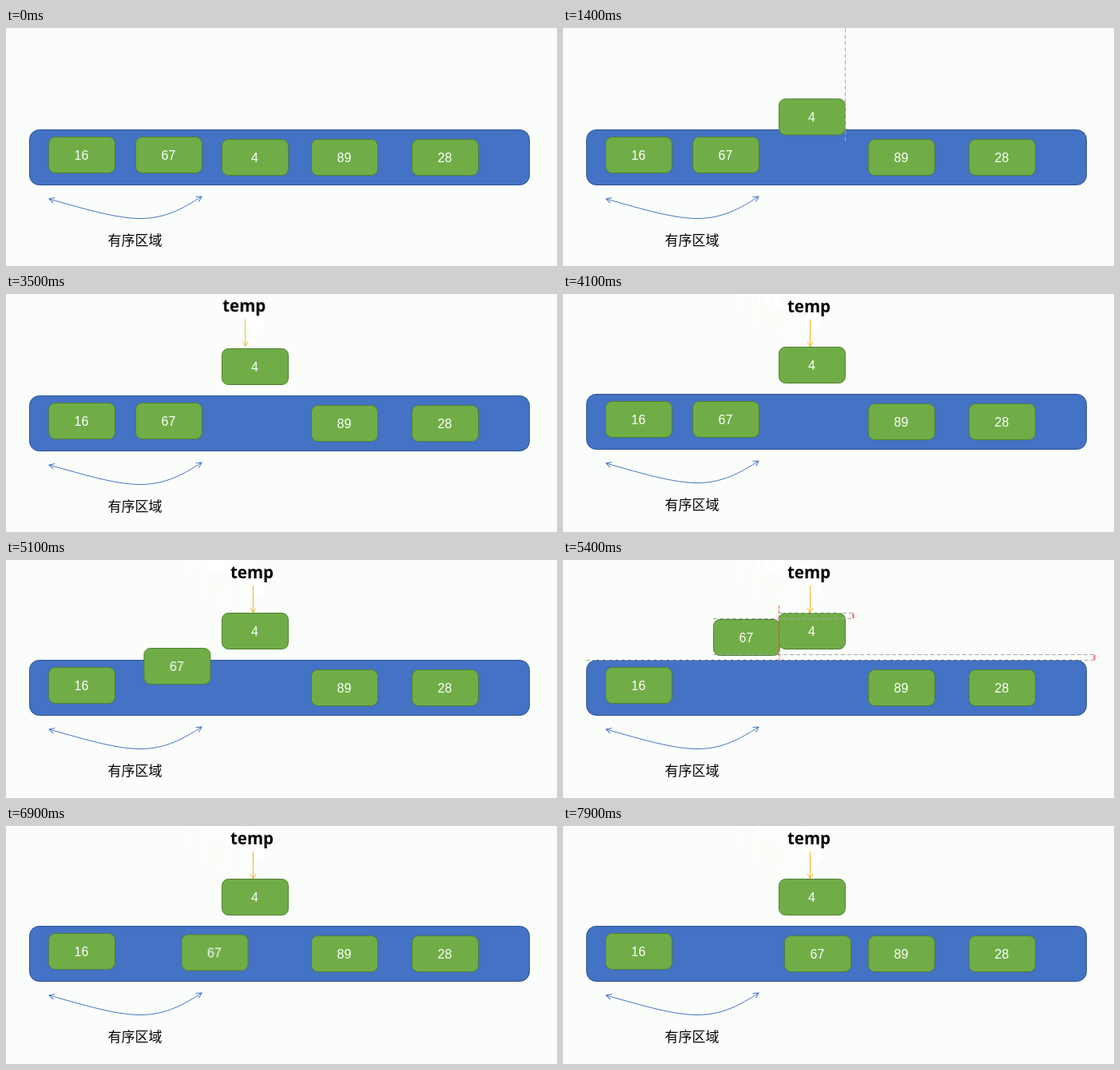
An HTML page that plays this animation: 690 px wide and 298 px high, repeating every 8 s.

```html
<!DOCTYPE html>
<html lang="zh">
<head>
<meta charset="utf-8">
<title>Insertion sort</title>
<style>
  html, body { margin: 0; width: 100%; height: 100%; overflow: hidden; background: #fbfdfa; }
  svg { display: block; width: 690px; height: 298px; }
  text { text-anchor: middle; }
  .bar { fill: #4472c4; stroke: #2f528f; }
  .card rect { fill: #70ad47; stroke: #507e32; }
  .card text { fill: #fff; font: 16px "Liberation Sans", Arial, sans-serif; }
  .range { fill: none; stroke: #4472c4; }
  .label { font: 17px "Noto Sans CJK SC", "Noto Sans CJK", sans-serif; }
  .name { font: 700 20.5px "Noto Sans", "Open Sans", sans-serif; }
  .guide { fill: none; stroke: #a6a6a6; stroke-dasharray: 5 3; }
  .hot { fill: none; stroke: #d9604a; stroke-dasharray: 4 2; }
  .tick { fill: none; stroke: #ff5a6e; stroke-width: 2; }
  .gap { stroke: #ff5555; fill: #ff5555; stroke-dasharray: 4 2; }
  .gap.dark { stroke: #c8304f; fill: #c8304f; }
  .handles * { fill: #fff; stroke: #8c8c8c; }
  .handles .line { fill: none; }
  .white * { stroke: #fff; fill: #fff; }
  .white .line { fill: none; }

  /* The small negative delay keeps the steps clear of the exact 100 ms marks. */
  .anim { animation: 8s linear -10ms infinite; }
  .show { opacity: 0; animation: 8s step-end -10ms infinite; }

  .scene { animation-name: scroll; animation-timing-function: step-end; }
  .four { animation-name: lift; }
  .sixtySeven { animation-name: carry; }
  .pointer { animation-name: place; }

  @keyframes scroll { 0% { transform: translateY(2px); } 47.5%, 100% { transform: none; } }
  @keyframes lift {
    0% { transform: translateY(71px); }
    12.5% { transform: translateY(71px); animation-timing-function: steps(7, start); }
    21.25%, 100% { transform: translateY(0); }
  }
  @keyframes place {
    0%, 35% { transform: translate(-86px, -42px); animation-timing-function: steps(2, end); }
    37.5% { transform: translate(-64px, -21px); animation-timing-function: steps(2, end); }
    40% { transform: translate(-39px, -11px); animation-timing-function: steps(4, end); }
    45%, 100% { transform: translate(0, 0); }
  }
  @keyframes carry {
    0% { transform: translate(0, 0); }
    62.5% { transform: translate(0, 0); animation-timing-function: steps(5, start); }
    68.75% { transform: translate(26px, -60px); }
    75% { transform: translate(26px, -60px); animation-timing-function: steps(3, start); }
    78.75% { transform: translate(2px, -12px); animation-timing-function: steps(2, start); }
    81.25% { transform: translate(0, 0); }
    83.75% { transform: translate(0, 0); animation-timing-function: steps(6, start); }
    91.25%, 100% { transform: translate(115px, 3px); }
  }

  @keyframes liftGuide { 12.5% { opacity: 1; } 23.75% { opacity: 0; } }
  @keyframes barGuide { 18.75% { opacity: 1; } 20% { opacity: 0; } }
  @keyframes pickFour { 23.75% { opacity: 1; } 32.5% { opacity: 0; } }
  @keyframes frameTrace { 32.5% { opacity: 1; } 47.5% { opacity: 0; } }
  @keyframes knobTrace { 32.5%, 100% { opacity: 1; } }
  @keyframes pointerIn { 35%, 100% { opacity: 1; } }
  @keyframes pointerGuide { 37.5% { opacity: 1; } 38.75% { opacity: 0; } }
  @keyframes trail { 45%, 100% { opacity: 1; } }
  @keyframes startGuide { 62.5% { opacity: 1; } 63.75% { opacity: 0; } }
  @keyframes topGuides { 67.5% { opacity: 1; } 75% { opacity: 0; } }
  @keyframes gapGuides { 77.5% { opacity: 1; } 78.75% { opacity: 0; } }
  @keyframes backGuides { 80% { opacity: 1; } 83.75% { opacity: 0; } }
  @keyframes pickSixtySeven { 93.75% { opacity: 1; } 98.75% { opacity: 0; } }
</style>
</head>
<body>
<svg viewBox="0 0 690 298">
  <defs>
    <rect id="box" x=".5" y=".5" width="83" height="45" rx="8"/>
    <marker id="open" viewBox="-8 -5 10 10" markerWidth="10" markerHeight="10" orient="auto-start-reverse">
      <path d="M-6.5-3.5L0 0L-6.5 3.5" fill="none" stroke="#4472c4"/>
    </marker>
    <g id="knob">
      <path class="line" d="M42-24V0"/>
      <circle cx="42" cy="-34" r="9.5"/>
      <path class="line" d="M46-37a5 5 0 1 0 1 4M47-40v4h-4"/>
    </g>
    <g id="dots">
      <rect class="line" x=".5" y=".5" width="83" height="45"/>
      <circle r="4.5"/><circle cx="42" r="4.5"/><circle cx="84" r="4.5"/>
      <circle cy="23" r="4.5"/><circle cx="84" cy="23" r="4.5"/>
      <circle cy="46" r="4.5"/><circle cx="42" cy="46" r="4.5"/><circle cx="84" cy="46" r="4.5"/>
    </g>
    <path id="arrow" d="M309.5 32V66M306 60L309.5 66L313 60" fill="none"/>
    <g id="trace">
      <use href="#arrow" stroke="#fff"/>
      <text class="name" x="308" y="23" fill="#fff">temp</text>
    </g>
  </defs>

  <g class="show" style="animation-name: trail">
    <use href="#trace" x="-86" y="-42"/>
    <use href="#trace" x="-64" y="-21"/>
    <use href="#trace" x="-39" y="-11"/>
    <use href="#trace" x="-27" y="-8"/>
    <use href="#trace" x="-15" y="-4"/>
  </g>
  <circle class="show" style="animation-name: knobTrace" cx="313" cy="35" r="11" fill="#fff"/>
  <path class="show" style="animation-name: frameTrace" d="M312 45V68M265 63H359V119H265Z"
        fill="none" stroke="#fff" stroke-width="2"/>

  <g class="scene anim">
    <rect class="bar" x="29.5" y="125.5" width="626" height="69" rx="12"/>
    <path class="range" d="M54 212C100 225 140 237 170 236.5C200 236 222 224 245 209"
          marker-start="url(#open)" marker-end="url(#open)"/>
    <text class="label" x="161.5" y="270">有序区域</text>

    <g class="card" transform="translate(53 134)"><use href="#box" fill="#70ad47" stroke="#507e32"/><text x="41.5" y="29">16</text></g>
    <g class="card" transform="translate(382 137)"><use href="#box" fill="#70ad47" stroke="#507e32"/><text x="41.5" y="29">89</text></g>
    <g class="card" transform="translate(508 137)"><use href="#box" fill="#70ad47" stroke="#507e32"/><text x="41.5" y="29">28</text></g>

    <g class="sixtySeven anim">
      <g class="card" transform="translate(162 134)">
        <use href="#box" fill="#70ad47" stroke="#507e32"/><text x="41.5" y="29">67</text>
        <g class="show handles" style="animation-name: pickSixtySeven"><use href="#dots"/><use href="#knob"/></g>
      </g>
    </g>

    <g class="four anim">
      <g class="card" transform="translate(270 66)">
        <use href="#box" fill="#70ad47" stroke="#507e32"/><text x="41.5" y="29">4</text>
        <g class="show handles" style="animation-name: pickFour"><use href="#dots"/><use href="#knob"/></g>
        <path class="guide show" style="animation-name: liftGuide" d="M83.5-160V56"/>
      </g>
    </g>

    <g class="show" style="animation-name: pointerIn">
      <g class="pointer anim">
        <text class="name" x="308" y="23">temp</text>
        <use href="#arrow" stroke="#f0b820"/>
      </g>
    </g>

    <path class="guide show" style="animation-name: barGuide" d="M19 125.5H666"/>
    <path class="guide show" style="animation-name: pointerGuide" d="M245.5 0V244"/>
    <path class="guide show" style="animation-name: startGuide" d="M162.5 124V289"/>
    <g class="show" style="animation-name: topGuides">
      <path class="guide" d="M188 73.5H363M270 66.5H363M188 118.5H665M29 125.5H665"/>
      <path class="hot" d="M270.5 57V129"/>
      <path class="tick" d="M363.5 67V73M665.5 119V125"/>
    </g>
    <g class="show" style="animation-name: gapGuides">
      <path class="guide" d="M29.5 125V205M164.5 122V205M247.5 122V195M382.5 137V195"/>
      <path class="gap" d="M33 204.5H161"/>
      <path d="M30 204.5l5-3v6zM164 204.5l-5-3v6z" fill="#ff5555"/>
      <path class="gap dark" d="M251 192.5H379"/>
      <path d="M248 192.5l5-3v6zM382 192.5l-5-3v6z" fill="#c8304f"/>
    </g>
    <path class="guide show" style="animation-name: backGuides" d="M43 134.5H256M162.5 124V289"/>
  </g>
</svg>
</body>
</html>
```
